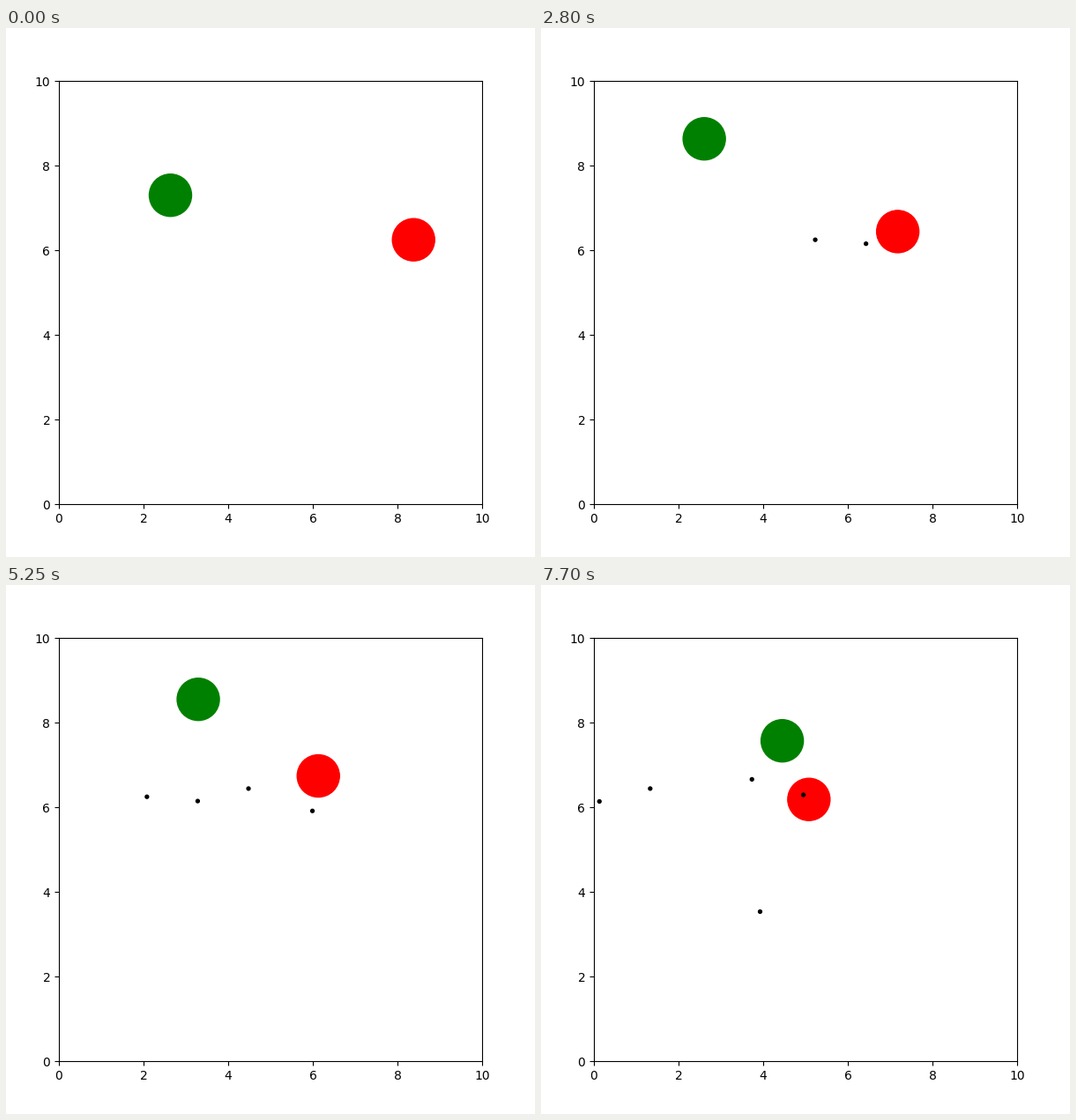
These frames come from a looping animation (600x600 px, 8 s). A matplotlib script:

```python
import numpy as np
import matplotlib.pyplot as plt
from matplotlib.animation import FuncAnimation
from matplotlib.patches import Circle

TICK = 50          # ms per drawn frame
HOLD = 7           # drawn frames per step
FRAMES = 160
SPEED = 21.6       # shot speed, px per step
RELOAD = 4         # steps between shots

# Turning points: (step, x, y) and (step, y), stage pixels, y downwards
GREEN = [(0, 186.5, 189.7), (2, 171.2, 171.2), (4, 156, 156),
         (5, 153.2, 150.2), (7, 174.3, 131.2), (9, 196, 120.2),
         (11, 180.2, 133.2), (12, 184.8, 138.1), (13, 194.2, 139),
         (16, 230, 125), (17, 242, 124.2), (18, 253.8, 135.1),
         (22, 273.6, 176.7)]
RED = [(0, 240.2), (1, 245.8), (4, 244.5), (5, 245.8), (7, 233.8), (9, 228),
       (12, 223.6), (16, 214.2), (18, 217), (20, 231.8), (22, 243.2)]
AIM = np.radians([0, 0.15, 0, 49.07, 3.3, 16.7])   # below the horizontal


def green_pos(step):
    t, x, y = zip(*GREEN)
    return np.interp(step, t, x), np.interp(step, t, y)


def red_pos(step):
    return 462.24 - 7.2 * step, np.interp(step, *zip(*RED))


def shot_pos(n, step):
    """A shot starts where the red ball was one step earlier."""
    born = n * RELOAD
    x, y = red_pos(born)
    path = SPEED * (step - born - 1)
    return x - path * np.cos(AIM[n]), y + path * np.sin(AIM[n])


def place(ball, pos):
    x, y = pos
    ball.center = (x - 60) / 48, (540 - y) / 48


fig = plt.figure(figsize=(6, 6), dpi=100)
ax = fig.add_axes([0.1, 0.1, 0.8, 0.8])
ax.set(xlim=(0, 10), ylim=(0, 10))


def ball(radius, color):
    return ax.add_patch(Circle((0, 0), radius, color=color))


green = ball(0.5, "green")
red = ball(0.5, "red")
shots = [ball(0.04, "black") for _ in AIM]


def update(i):
    step = i // HOLD
    place(green, green_pos(step))
    place(red, red_pos(step))
    for n, shot in enumerate(shots):
        shot.set_visible(step > n * RELOAD)
        place(shot, shot_pos(n, step))
    return green, red, *shots


anim = FuncAnimation(fig, update, frames=FRAMES, interval=TICK, repeat=True)
plt.show()
```
